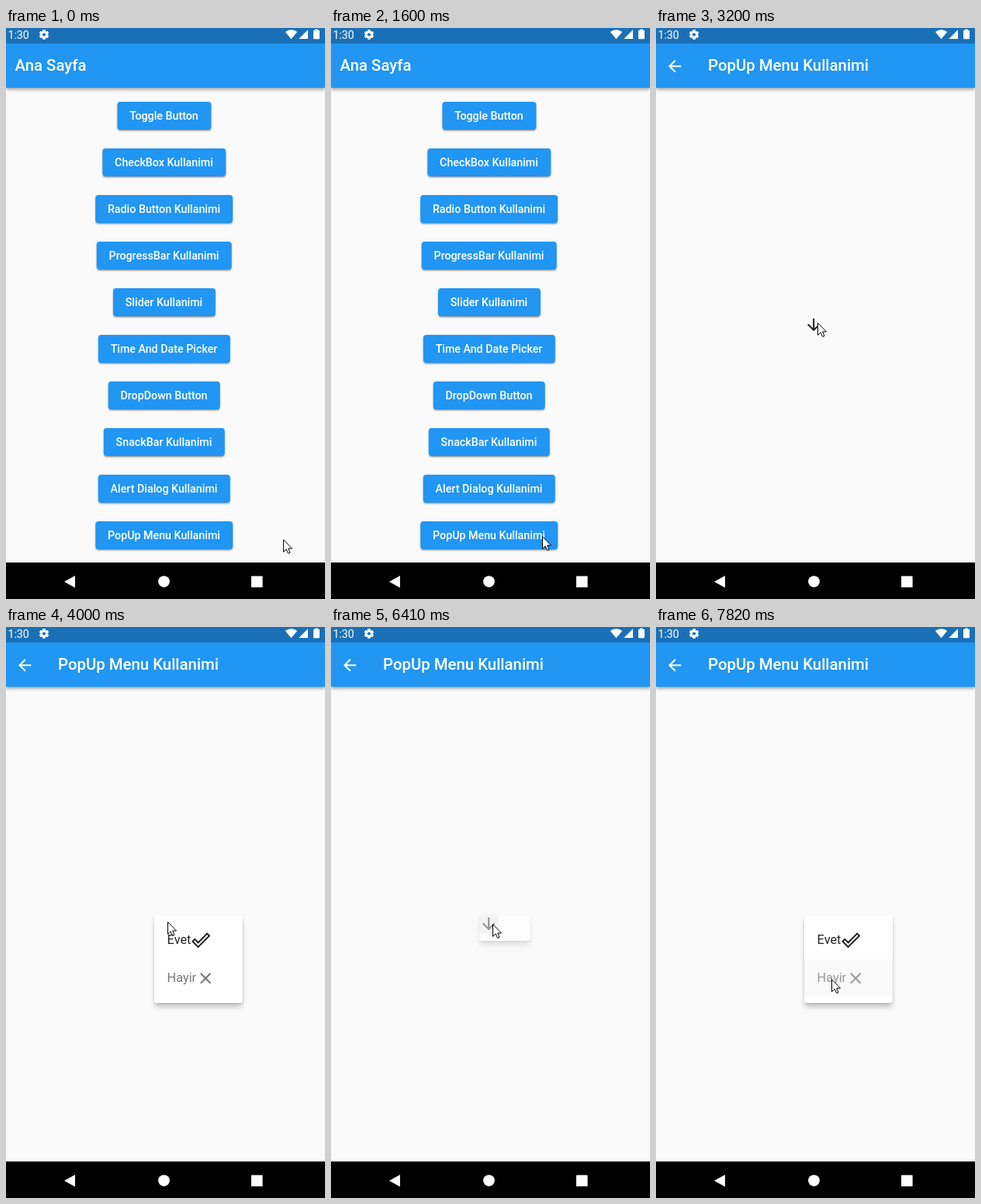
Write an HTML page that moves like this. It is 411 by 735 pixels and loops after 8 s.

```html
<!DOCTYPE html>
<html lang="tr">
<head>
<meta charset="utf-8">
<title>Ana Sayfa</title>
<style>
html, body { margin: 0; width: 100%; height: 100%; overflow: hidden; background: #fafafa; }
body { position: relative; font-family: Roboto, "Noto Sans", sans-serif; }
div, svg, span { position: absolute; }
svg { overflow: visible; }
.stage { left: 0; top: 0; width: 411px; height: 735px; overflow: hidden; background: #fafafa; }

/* every animated part shares one 8 s clock and changes in hard steps */
.page, .popup, .row, .tint, .ink, .cursor, .ring {
  animation: 8s step-end infinite;
}

.bar {
  left: 0; top: 20px; width: 411px; height: 57px; background: #2196f3;
  box-shadow: 0 2px 4px -1px rgba(0,0,0,.22), 0 3px 4px rgba(0,0,0,.16), 0 1px 6px rgba(0,0,0,.08);
}
.bar span { line-height: 57px; font-size: 20.36px; font-weight: 500; color: #fff; white-space: nowrap; }
.status { left: 0; top: 0; width: 411px; height: 20px; background: #1a70b7; }
.status span { left: 2.4px; top: 0; line-height: 18px; font-size: 14.25px; color: #fff; }
.nav { left: 0; top: 688px; width: 411px; height: 47px; background: #000; }

.btn {
  left: 203.5px; transform: translateX(-50%); height: 36.6px; padding: 0 16.3px; border-radius: 4px;
  background: #2196f3; color: #fff; font-size: 14.25px; font-weight: 500; line-height: 36.6px; white-space: nowrap;
  box-shadow: 0 2px 1px -1px rgba(0,0,0,.2), 0 2px 2px rgba(0,0,0,.14), 0 1px 3px rgba(0,0,0,.12);
}

.page { left: 0; top: 0; width: 411px; height: 735px; visibility: hidden; animation-name: page; }
.paper { left: 0; top: 20px; width: 411px; height: 715px; background: #fafafa; }
.ink { left: 191.3px; top: 370.6px; width: 24.4px; height: 24.4px; background: rgba(0,0,0,.07); opacity: 0; animation-name: ink; }

.popup {
  left: 191.3px; top: 371px; width: 114px; height: 113.2px; border-radius: 3px; overflow: hidden;
  background: #fff; opacity: 0; animation-name: popup;
  box-shadow: 0 6px 7px -1px rgba(0,0,0,.22), 0 1px 3px rgba(0,0,0,.16);
}
.row, .tint { left: 0; width: 114px; height: 48.8px; }
.row span { left: 16.3px; line-height: 48.8px; font-size: 16.3px; }
.yes { top: 7.8px; color: #212121; fill: #212121; }
.no { top: 56.6px; color: #757575; fill: #757575; }
.row.yes { animation-name: yes; }
.row.no { animation-name: no; }
.tint { background: #000; opacity: 0; }
.tint.yes { animation-name: tint-yes; }
.tint.no { animation-name: tint-no; }

.cursor { left: 0; top: 0; width: 0; height: 0; animation-name: move; }
.ring { left: -12px; top: -12px; width: 24px; height: 24px; border-radius: 50%; background: rgba(255,255,0,.47); opacity: 0; animation-name: click; }

@keyframes page {
  0% { visibility: hidden; }
  27.5% { visibility: visible; transform: translateY(1px); }
  30%, 100% { visibility: visible; transform: none; }
}
@keyframes ink {
  0%, 82.625%, 100% { opacity: 0; }
  80.125% { opacity: 1; }
}
@keyframes popup {
  0%, 67.625% { opacity: 0; }
  47.5% { opacity: 1; width: 114px; height: 99px; }
  50%, 82.625%, 100% { opacity: 1; width: 114px; height: 113.2px; }
  80.125% { opacity: .5; width: 66px; height: 33px; }
}
@keyframes yes {
  0%, 80.125% { opacity: 0; }
  47.5% { opacity: .5; }
  50%, 82.625%, 100% { opacity: 1; }
}
@keyframes no {
  0%, 80.125% { opacity: 0; }
  50%, 85.125% { opacity: 1; }
  82.625% { opacity: .6; }
  97.75%, 100% { opacity: .73; }
}
@keyframes tint-yes {
  0%, 67.625%, 100% { opacity: 0; }
  65.125% { opacity: .043; }
}
@keyframes tint-no {
  0% { opacity: 0; }
  97.75%, 100% { opacity: .024; }
}
@keyframes click {
  0%, 20%, 47.5%, 65.125%, 97.75%, 100% { opacity: 0; }
  17.5%, 45%, 62.625%, 95.25% { opacity: 1; }
}
@keyframes move {
  0% { transform: translate(357px, 658px); }
  4.75% { transform: translate(315px, 657px); }
  7.5% { transform: translate(272px, 654px); }
  30% { transform: translate(266px, 620px); }
  32.5% { transform: translate(248px, 545px); }
  35% { transform: translate(228px, 460px); }
  37.5% { transform: translate(212px, 400px); }
  40% { transform: translate(208px, 379px); }
  52.625% { transform: translate(209px, 384px); }
  55.125% { transform: translate(212px, 394px); }
  57.625% { transform: translate(214px, 401px); }
  72.625% { transform: translate(211px, 392px); }
  75.125% { transform: translate(209px, 385px); }
  77.625% { transform: translate(208px, 382px); }
  85.125% { transform: translate(209px, 408px); }
  87.625%, 100% { transform: translate(226px, 453px); }
}
</style>
</head>
<body>
<div class="stage">
  <div class="home" id="home">
    <div class="bar"><span style="left:11.6px">Ana Sayfa</span></div>
  </div>

  <div class="page">
    <div class="paper"></div>
    <div class="bar">
      <svg style="left:11.6px;top:16.5px" width="24.4" height="24.4" viewBox="0 0 24 24" fill="#fff"><path d="M20 11H7.83l5.59-5.59L12 4l-8 8 8 8 1.41-1.41L7.83 13H20z"/></svg>
      <span style="left:67px">PopUp Menu Kullanimi</span>
    </div>
    <svg style="left:191.3px;top:370.4px" width="24.4" height="24.4" viewBox="0 0 24 24" fill="#212121"><path d="M20 12l-1.41-1.41L13 16.17V4h-2v12.17l-5.58-5.59L4 12l8 8z"/></svg>
    <div class="ink"></div>
    <div class="popup">
      <div class="tint yes"></div>
      <div class="tint no"></div>
      <div class="row yes">
        <span>Evet</span>
        <svg style="left:47.5px;top:12.2px" width="24.4" height="24.4" viewBox="0 0 24 24"><path d="M19.77 5.03l1.4 1.4L8.43 19.17l-5.6-5.6 1.4-1.4 4.2 4.2L19.77 5.03m0-2.83L8.43 13.54l-4.2-4.2L0 13.57 8.43 22 24 6.43z"/></svg>
      </div>
      <div class="row no">
        <span>Hayir</span>
        <svg style="left:53.6px;top:12.2px" width="24.4" height="24.4" viewBox="0 0 24 24"><path d="M19 6.41L17.59 5 12 10.59 6.41 5 5 6.41 10.59 12 5 17.59 6.41 19 12 13.41 17.59 19 19 17.59 13.41 12z"/></svg>
      </div>
    </div>
  </div>

  <div class="status">
    <span>1:30</span>
    <svg style="left:0;top:0" width="411" height="20" fill="#fff">
      <g transform="translate(49 8.5)">
        <circle r="4.6"/>
        <path id="tooth" d="M-1.7-6.2h3.4l.6 3v6.4l-.6 3h-3.4l-.6-3v-6.4z"/>
        <use href="#tooth" transform="rotate(60)"/>
        <use href="#tooth" transform="rotate(120)"/>
        <circle r="2.1" fill="#1a70b7"/>
      </g>
      <path d="M359.8 5a12.2 12.2 0 0 1 15.4 0L367.5 14.2z"/>
      <path d="M389 2.3V14H377.3z"/>
      <path d="M398.3 2.8v-1.3h3.4v1.3h1.3q1 0 1 1v9.4q0 1-1 1h-6q-1 0-1-1V3.8q0-1 1-1z"/>
    </svg>
  </div>

  <div class="nav">
    <svg style="left:0;top:0" width="411" height="47" fill="#fff">
      <path d="M75 24.7L89 17v15.4z"/>
      <circle cx="203.5" cy="24.6" r="7.4"/>
      <rect x="316" y="17.4" width="14.6" height="14.6" rx=".6"/>
    </svg>
  </div>

  <div class="cursor">
    <svg style="left:0;top:0" width="12" height="19"><path d="M.5.7V16.4L4.2 12.9l2.4 5.5 2.4-1L6.7 12h4.8z" fill="#fff" stroke="#000"/></svg>
    <div class="ring"></div>
  </div>
</div>
<script>
const labels = [
  "Toggle Button", "CheckBox Kullanimi", "Radio Button Kullanimi", "ProgressBar Kullanimi",
  "Slider Kullanimi", "Time And Date Picker", "DropDown Button", "SnackBar Kullanimi",
  "Alert Dialog Kullanimi", "PopUp Menu Kullanimi"
];
const home = document.getElementById("home");
labels.forEach((label, i) => {
  const btn = document.createElement("div");
  btn.className = "btn";
  btn.textContent = label;
  btn.style.top = 94.6 + 60 * i + "px";
  home.append(btn);
});
</script>
</body>
</html>
```
